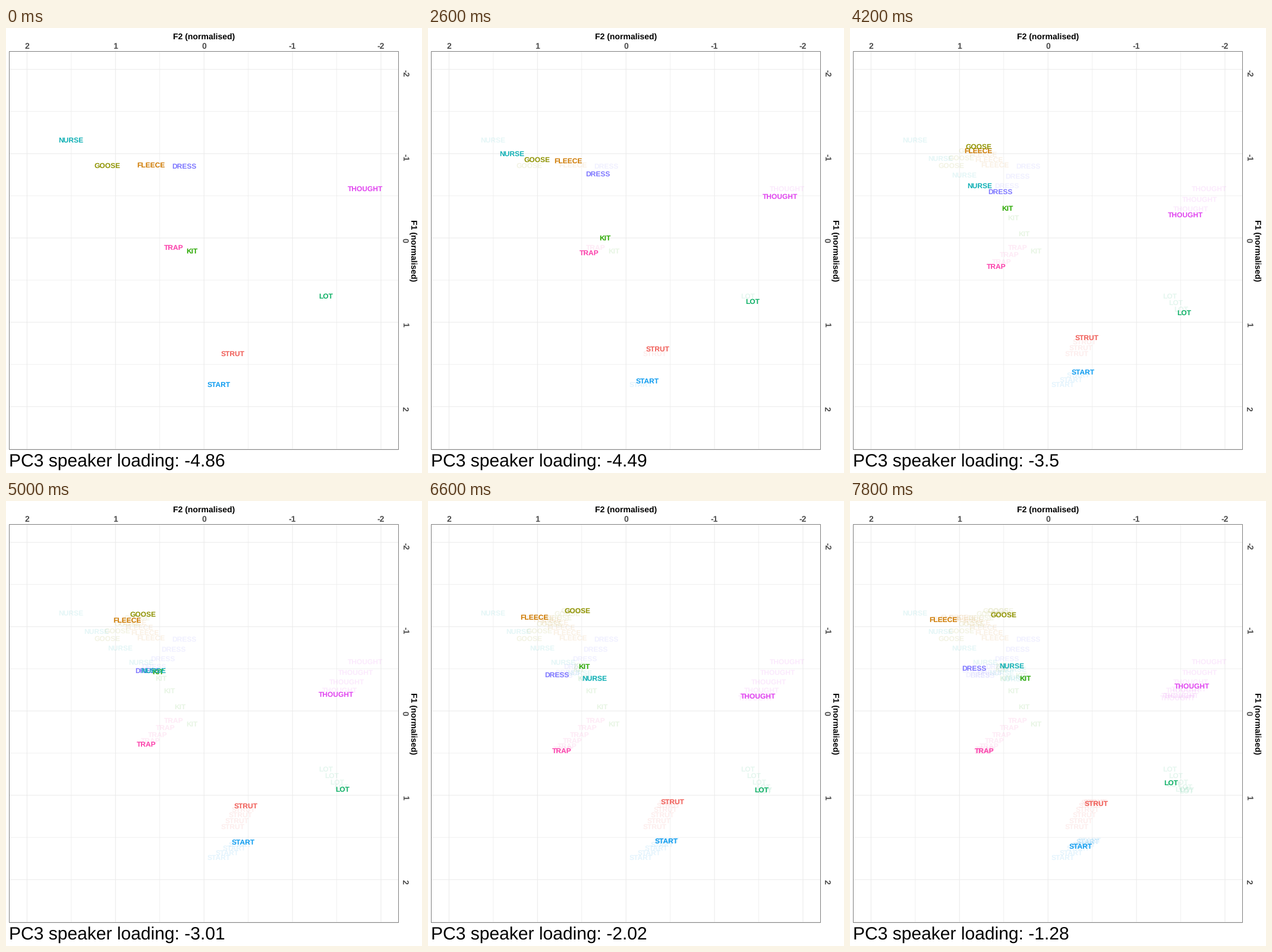
A matplotlib script for the animation above (8 s loop, 700 by 750 pixels).

```python
import matplotlib.pyplot as plt
import numpy as np
from matplotlib.animation import FuncAnimation
from matplotlib.patches import Rectangle

W, H, DPI = 700, 750, 100
PX = 72 / DPI                      # points per pixel
FRAMES, INTERVAL = 40, 200
HOLD = 10                          # frames before the words start to move
LOAD_START, LOAD_STEP = -4.86, 0.1235
LEFT, TOP, RIGHT, BOTTOM = 5.5, 39.5, 660.5, 710.5

plt.rcParams["font.family"] = "Liberation Sans"
plt.rcParams["text.hinting"] = "none"

# Colour, then the word's centre at each key frame; a cubic joins the four
KEYS = [HOLD, 18, 30, FRAMES - 1]
WORDS = {
    "DRESS": ("#7F78FF", (299.5, 233), (264.3, 265.5), (223, 293.5), (208.5, 282)),
    "FLEECE": ("#CF7A00", (243.5, 231), (223.5, 212.7), (189, 196.6), (157, 200)),
    "GOOSE": ("#8F9300", (170, 231.5), (204.7, 207), (245.4, 185.2), (258, 192)),
    "KIT": ("#2AA800", (313, 376), (274.6, 320.5), (254.5, 277), (295, 299)),
    "LOT": ("#0EB066", (538.5, 452), (557.2, 473.6), (566, 489), (540.5, 475)),
    "NURSE": ("#10B0B5", (109, 189), (192, 248), (274.5, 299.5), (272, 278)),
    "START": ("#0E9CF0", (358.5, 601), (384.5, 585), (403, 572), (388.5, 582)),
    "STRUT": ("#F05D57", (381.5, 549), (394.5, 528.5), (409, 508), (415, 510)),
    "THOUGHT": ("#E145F0", (604.5, 271), (573.5, 305), (552, 331.5), (575.5, 312)),
    "TRAP": ("#FB40AB", (282, 370), (254.8, 394), (227.5, 418.5), (226, 421)),
}
CAP_HALF = 4                       # from a word's centre down to its baseline

# Words run straight between states; every state leaves a faint copy behind
STATES = np.arange(HOLD, FRAMES, 4)
STOPS = np.append(STATES, FRAMES - 1)


def path(points):
    """x and y of a word's baseline at every stop."""
    cubic = np.polyfit(KEYS, points, 3)
    x, y = (np.vander(STOPS, 4) @ cubic).T
    return x, y + CAP_HALF


def x_pix(v):
    return 333.2 - 148.9 * v


def y_pix(v):
    return 353.9 + 142.1 * v


fig = plt.figure(figsize=(W / DPI, H / DPI), dpi=DPI, facecolor="white")
ax = fig.add_axes([0, 0, 1, 1])
ax.set(xlim=(0, W), ylim=(H, 0))
ax.axis("off")


def label(x, y, text, size, color="black", **kw):
    opts = dict(ha="center", va="baseline", weight="bold",
                rotation_mode="anchor")
    opts.update(kw)
    return ax.text(x, y, text, fontsize=size * PX, color=color, **opts)


def grid(xs, ys, width):
    style = dict(color="#EBEBEB", lw=width * PX, snap=False,
                 solid_capstyle="butt", zorder=1)
    for v in xs:
        ax.plot([x_pix(v)] * 2, [TOP, BOTTOM], **style)
    for v in ys:
        ax.plot([LEFT, RIGHT], [y_pix(v)] * 2, **style)


ticks = np.arange(-2, 3)
grid(ticks[:-1] + 0.5, ticks + 0.5, 0.7)
grid(ticks, ticks, 1.07)
ax.add_patch(Rectangle((LEFT, TOP), RIGHT - LEFT, BOTTOM - TOP, fill=False,
                       ec="#7F7F7F", lw=PX, snap=False, zorder=2))

for v in ticks:
    label(x_pix(v), 35, str(v), 14, "#4D4D4D")
    label(667, y_pix(v), str(v), 14, "#4D4D4D", ha="left", rotation=270)
label(333, 19, "F2 (normalised)", 14)
label(681, 375.5, "F1 (normalised)", 14, rotation=270)
caption = label(5, 739, "", 30, ha="left", weight="normal")

movers, ghosts = [], []
for word, (color, *points) in WORDS.items():
    xs, ys = path(points)
    movers.append((label(xs[0], ys[0], word, 12, color, zorder=5), xs, ys))
    for state, x, y in zip(STATES, xs, ys):
        ghost = label(x, y, word, 12, color, alpha=0.11, zorder=3)
        ghosts.append((ghost, state))


def draw(n):
    for text, xs, ys in movers:
        text.set_position((np.interp(n, STOPS, xs), np.interp(n, STOPS, ys)))
    for ghost, state in ghosts:
        ghost.set_visible(n > state)
    load = LOAD_START + LOAD_STEP * max(0, n - HOLD)
    caption.set_text(f"PC3 speaker loading: {round(load, 2):g}")
    return []


anim = FuncAnimation(fig, draw, frames=FRAMES, interval=INTERVAL,
                     init_func=lambda: draw(0), repeat=True, repeat_delay=0)
plt.show()
```
